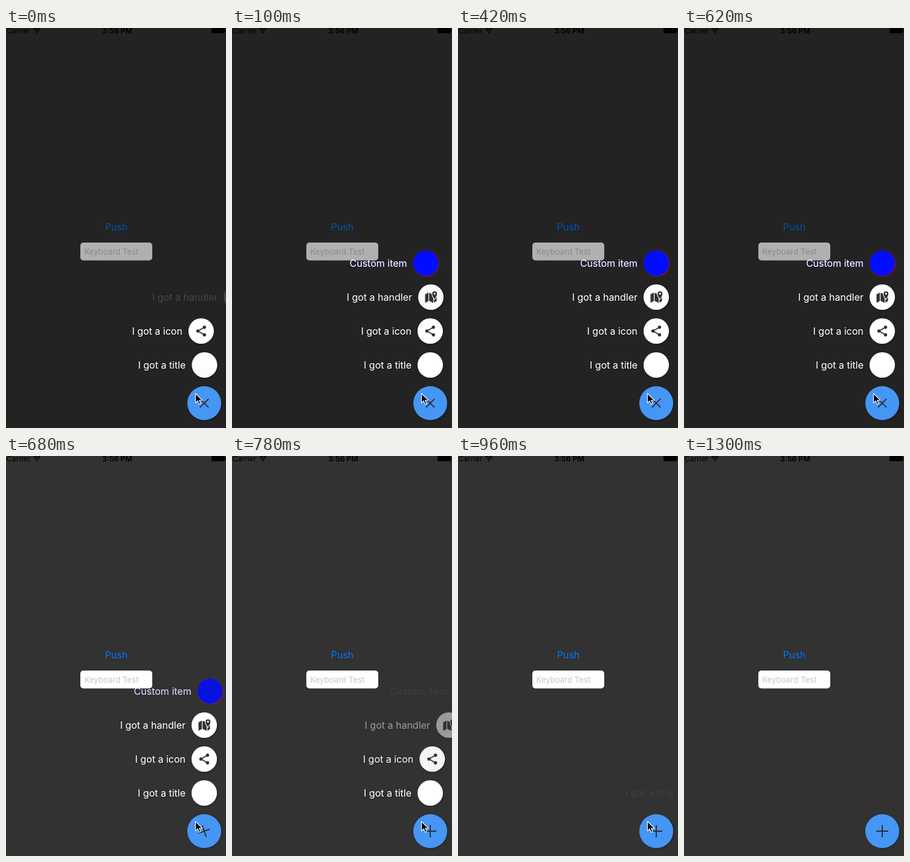
Write an HTML page that moves like this. It is 364x660 px and loops after 1640 ms.

```html
<!DOCTYPE html>
<html lang="en">
<head>
<meta charset="utf-8">
<title>Floating action menu</title>
<style>
  html, body { margin: 0; width: 100%; height: 100%; overflow: hidden; background: #323232; }
  svg { display: block; width: 100%; height: 100%; }
  text { font-family: Inter, Roboto, sans-serif; font-size: 16px; white-space: pre; }
  .status { font-size: 12px; }
</style>
</head>
<body>
<svg viewBox="0 0 364 660">
  <defs>
    <filter id="black" x="-20%" y="-50%" width="140%" height="200%">
      <feDropShadow dx="1" dy="1" stdDeviation="1.8" flood-color="#000" flood-opacity=".4"/>
    </filter>
    <filter id="red" x="-20%" y="-50%" width="140%" height="200%">
      <feDropShadow dx="1" dy="1" stdDeviation="1.8" flood-color="#f00" flood-opacity=".4"/>
    </filter>
    <filter id="blue" x="-20%" y="-50%" width="140%" height="200%">
      <feDropShadow dx="1" dy="1" stdDeviation="1.8" flood-color="#00f" flood-opacity=".4"/>
    </filter>
    <g id="share" fill="#323232" stroke="#323232" stroke-width="1.8">
      <path d="M5.4-6.3-5.4 0 5.4 6.3" fill="none"/>
      <g stroke="none">
        <circle cx="5.4" cy="-6.3" r="2.7"/>
        <circle cx="-5.4" r="2.7"/>
        <circle cx="5.4" cy="6.3" r="2.7"/>
      </g>
    </g>
    <g id="map" fill="#323232">
      <path d="M-9.5-4.5-4-7.5V6.5L-9.5 9.5ZM-2.8-7.3 1-5.4Q1.2-1.5 4 2V9.4L-2.8 6.3ZM5.2 3.4 6.2 4.5 9.5 0V6.4L5.2 9.2Z"/>
      <path fill-rule="evenodd" d="M6.2 3C4 .2 2.2-2.8 2.2-5.6a4 4 0 0 1 8 0C10.2-2.8 8.4.2 6.2 3ZM6.2-7.2a1.6 1.6 0 1 0 .01 0Z"/>
    </g>
  </defs>

  <rect width="364" height="660" fill="#323232"/>
  <text x="182.5" y="333.5" text-anchor="middle" fill="#0074ff">Push</text>
  <rect x="123" y="354" width="119" height="29.5" rx="5" fill="#fff"/>
  <text x="129.5" y="373.5" fill="#c7c7cd" style="font-size:13.2px">Keyboard Test</text>
  <rect id="overlay" width="364" height="660"/>

  <text class="status" x="1" y="9">Carrier</text>
  <g fill="none" stroke="#000" stroke-width="1.7">
    <path d="M45.6 2.6Q51.2-2.4 56.8 2.6M47.7 4.9Q51.2 1.9 54.7 4.9"/>
    <path d="M51.2 8.6 49.3 6.6Q51.2 5 53.1 6.6Z" fill="#000" stroke="none"/>
  </g>
  <text class="status" x="184" y="9" text-anchor="middle" font-weight="600" style="font-size:12.3px">3:56 PM</text>
  <path d="M340 0H362V8.6H340ZM362.8 2.6H364V6H362.8Z"/>

  <g id="items"></g>

  <g transform="translate(328 619)">
    <circle r="28" fill="#4596f5" filter="url(#black)"/>
    <path id="plus" d="M-10 0H10M0-10V10" stroke="#2d2d2d" stroke-width="1.9"/>
  </g>
  <path id="cursor" d="M0 0V15.6L3.6 12.2 6 17.8 8.6 16.7 6.2 11.2H11.2Z" stroke="#fff" stroke-width="1.1" stroke-linejoin="round"/>
</svg>

<script>
const LOOP = 1640, STEP = 20;
const RATE = 5 / 3;
const CLOSE = 631;         // menu starts closing
const HOLD = 960, LEAVE = 1160, GONE = 1300;
const SLIDE = 63;

const $ = id => document.getElementById(id);
const clamp = v => Math.min(1, Math.max(0, v));
const mix = (a, b, u) => a + (b - a) * u;

function bezier(x1, y1, x2, y2) {
  const at = (a, b, s) => 3 * (1 - s) * (1 - s) * s * a + 3 * (1 - s) * s * s * b + s * s * s;
  return p => {
    if (p <= 0 || p >= 1) return clamp(p);
    let lo = 0, hi = 1;
    for (let i = 0; i < 24; i++) {
      const mid = (lo + hi) / 2;
      if (at(x1, x2, mid) < p) lo = mid; else hi = mid;
    }
    return at(y1, y2, lo);
  };
}
const easeInOut = bezier(.42, 0, .58, 1);
const ease = bezier(.25, .1, .25, 1);

// Damped spring from 1 to 0 that settles in 300 ms.
function spring(age, damping) {
  if (age <= 0) return 1;
  if (age >= 300) return 0;
  const decay = 6.9 / 300;
  const freq = decay / damping * Math.sqrt(1 - damping * damping);
  return Math.exp(-decay * age) * (Math.cos(freq * age) + decay / freq * Math.sin(freq * age));
}

const items = [
  { title: "I got a title" },
  { title: "I got a icon", icon: "share" },
  { title: "I got a handler", icon: "map" },
  { title: "Custom item", fill: "#0008ff", glow: "red", textGlow: "blue" }
];

$("items").innerHTML = items.map((item, i) => {
  const { title, icon, fill = "#fff", glow = "black", textGlow = "black" } = item;
  item.y = 556 - 56 * i;
  return `<g>
    <text x="-31" y="5.7" text-anchor="end" fill="#fff" filter="url(#${textGlow})">${title}</text>
    <circle r="21" fill="${fill}" filter="url(#${glow})"/>
    ${icon ? `<use href="#${icon}"/>` : ""}
  </g>`;
}).join("");
const nodes = [...$("items").children];

function render(t) {
  const menu = t < LEAVE ? Math.min(t, HOLD) : LOOP;
  const closing = (menu - CLOSE) * RATE;

  items.forEach((item, i) => {
    const shift = closing < 0
      ? spring(menu * RATE + 215 - 100 * i, .55)
      : easeInOut((closing - 100 * (3 - i)) / 300);
    nodes[i].setAttribute("transform", `translate(${328 + SLIDE * shift} ${item.y})`);
    nodes[i].setAttribute("opacity", clamp(1 - shift));
  });

  $("overlay").setAttribute("opacity", .31 * clamp(spring(closing, .6)));
  $("plus").setAttribute("transform", `rotate(${-45 * (1 - ease(closing / 250))})`);

  const u = clamp((t - LEAVE + STEP) / (GONE - LEAVE));
  const away = u * u * (3 - 2 * u);
  $("cursor").setAttribute("transform", `translate(${mix(313.5, 166, away)} ${mix(603, 21, away)})`);
  $("cursor").setAttribute("opacity", t < GONE ? 1 : 0);
}

const start = performance.now();
function tick() {
  const t = (performance.now() - start) % LOOP;
  render(Math.floor(t / STEP) * STEP);
  requestAnimationFrame(tick);
}
tick();
</script>
</body>
</html>
```
